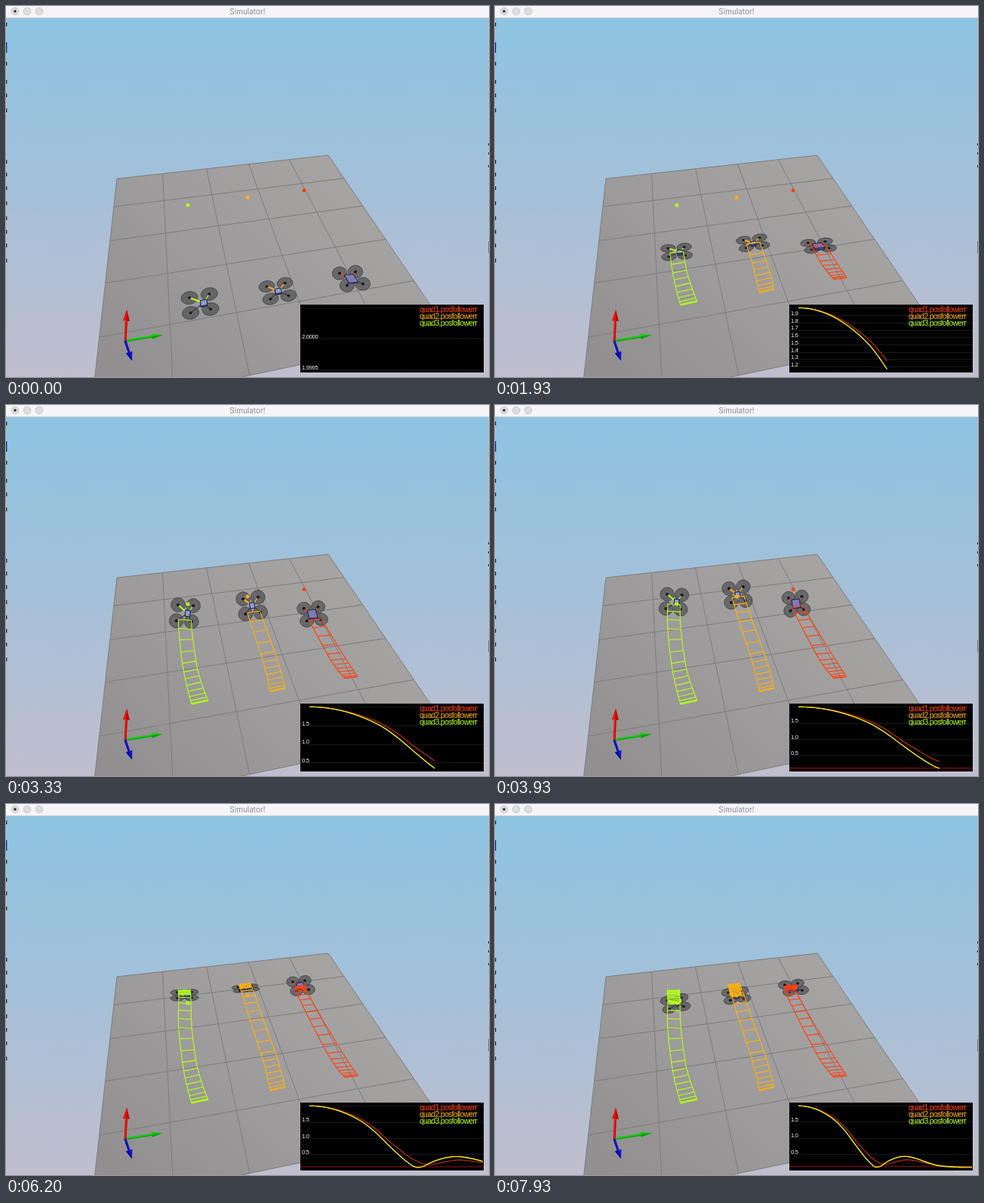
These frames come from a looping animation (640 by 492 pixels, 8 s). An HTML page with a canvas:

```html
<!DOCTYPE html>
<html lang="en">
<head>
<meta charset="utf-8">
<title>Simulator!</title>
<style>
html, body { margin: 0; width: 100%; height: 100%; overflow: hidden; }
canvas { display: block; width: 640px; height: 492px; }
</style>
</head>
<body>
<canvas id="stage" width="640" height="492"></canvas>
<script>
const c = document.getElementById('stage').getContext('2d');
const LOOP = 8000, FPS = 15, RUNG = 13;

// Wall clock (ms) to simulation time; the simulator does not run at a steady rate.
const clock = [0, 1200, 2670, 3930, 5000, 6200, 7930];
const simAt = [0, 92, 143, 187, 224, 307, 425];

// Pose channels: centre x, y; half span across x, y; half span along x, y.
const drones = [
  { color: '#ff4010', dot: [395, 244.5], box: 0.58, shift: 0, fill: '#7f7bb4', pose: [
    [457.5, 440, 415.5, 399, 391.5, 390.5, 395.5],
    [361.5, 337, 294.5, 263.5, 248, 241, 243.5],
    [10.5, 12, 10.2, 8.8, 8.3, 8, 8.5],
    [-1, -1, -1, -1, -1, -0.8, -1],
    [5, 2.5, 2.7, 1.3, 1.8, 2.5, 3],
    [8, 2.5, 7.5, 8.5, 8.3, 6, 4.6]] },
  { color: '#ffb010', dot: [320, 254], box: 0.32, shift: 0.06, fill: '#8f9ccd', pose: [
    [360, 350, 332, 321, 316, 317.5, 319.5],
    [378, 338.5, 286, 251.5, 239, 244.5, 254],
    [12, 11, 10.3, 9.5, 9, 8.7, 9],
    [-2.2, -2, -1.2, -1.2, -1, -0.8, -1.2],
    [2.5, 2, 1.7, 1.5, 1, 1, 1.5],
    [8.3, 1.5, 9.8, 9.3, 9, 2.3, 5.2]] },
  { color: '#b4ff18', dot: [241, 264], box: 0.32, shift: 0.38, fill: '#8f9ccd', pose: [
    [257, 244.5, 237.5, 237, 236.5, 236.5, 239],
    [394.5, 351.5, 297, 261, 247.5, 253.5, 264.5],
    [13.2, 11, 10.5, 9.7, 9.5, 9.5, 9.5],
    [-2.5, -2, 0.3, 0.5, 0, -0.3, -1.7],
    [0.8, 2, -1, -0.8, 0, 0, 1.5],
    [10, 1.5, 10.7, 9.5, 9.5, 3.8, 5.7]] }
];

// Follow error of the drones over simulation time.
const errKeys = [0, 30, 60, 92, 115, 143, 158, 172, 187, 200, 212, 224, 245, 265, 290, 307, 340, 380, 425];
const errSlow = [2, 1.955, 1.82, 1.58, 1.31, 0.87, 0.66, 0.46, 0.3, 0.2, 0.17, 0.19, 0.27, 0.31, 0.27, 0.22, 0.14, 0.1, 0.08];
const errFast = [2, 1.948, 1.794, 1.515, 1.2, 0.72, 0.47, 0.26, 0.09, 0.1, 0.2, 0.29, 0.39, 0.41, 0.34, 0.26, 0.13, 0.08, 0.07];

function segment(xs, x) {
  let i = 0;
  while (i < xs.length - 2 && x > xs[i + 1]) i++;
  return i;
}

function linear(xs, ys, x) {
  const i = segment(xs, x);
  return ys[i] + (ys[i + 1] - ys[i]) * (x - xs[i]) / (xs[i + 1] - xs[i]);
}

// Cubic spline, at rest at both ends.
function spline(xs, ys, x) {
  const i = segment(xs, x), h = xs[i + 1] - xs[i], u = Math.min(1, (x - xs[i]) / h);
  const slope = k => k < 1 || k > xs.length - 2 ? 0 : (ys[k + 1] - ys[k - 1]) / (xs[k + 1] - xs[k - 1]);
  const v = 1 - u;
  return ys[i] * (1 + 2 * u) * v * v + ys[i + 1] * u * u * (3 - 2 * u)
    + h * u * v * (slope(i) * v - slope(i + 1) * u);
}

function line(points, color, width = 1) {
  c.beginPath();
  points.forEach(p => c.lineTo(p[0], p[1]));
  c.strokeStyle = color;
  c.lineWidth = width;
  c.stroke();
}

function poly(points, fill, stroke, width = 1) {
  c.beginPath();
  points.forEach(p => c.lineTo(p[0], p[1]));
  c.closePath();
  c.fillStyle = fill;
  c.fill();
  if (stroke) {
    c.strokeStyle = stroke;
    c.lineWidth = width;
    c.stroke();
  }
}

function disc(x, y, rx, ry, turn, fill, stroke) {
  c.beginPath();
  c.ellipse(x, y, rx, ry, turn, 0, Math.PI * 2);
  c.fillStyle = fill;
  c.fill();
  if (stroke) {
    c.strokeStyle = stroke;
    c.lineWidth = 0.9;
    c.stroke();
  }
}

function gradient(x0, y0, x1, y1, ...colors) {
  const g = c.createLinearGradient(x0, y0, x1, y1);
  colors.forEach((k, i) => g.addColorStop(i / (colors.length - 1), k));
  return g;
}

// Projective map from the unit square to the four floor corners.
function projector([p, q, r, s]) {
  const sum = k => p[k] - q[k] + r[k] - s[k];
  const [ax, ay, bx, by] = [q[0] - r[0], q[1] - r[1], s[0] - r[0], s[1] - r[1]];
  const det = ax * by - bx * ay;
  const g = (sum(0) * by - bx * sum(1)) / det;
  const h = (ax * sum(1) - sum(0) * ay) / det;
  return (u, v) => [0, 1].map(k =>
    ((q[k] - p[k] + g * q[k]) * u + (s[k] - p[k] + h * s[k]) * v + p[k]) / (g * u + h * v + 1));
}
const corners = [[147, 229], [427, 198], [588, 434], [113, 534]];
const floor = projector(corners);

function drawWindow() {
  c.fillStyle = gradient(0, 15, 0, 492, '#8dc4e2', '#a5c0d9', '#c1bece');
  c.fillRect(0, 0, 640, 492);

  poly(corners, gradient(420, 200, 150, 492, '#a6a4a3', '#9d9b9b', '#918f90'));
  for (let i = 0; i <= 5; i++) {
    line([floor(0, i / 5), floor(1, i / 5)], '#7d7c7d');
    line([floor(i / 5, 0), floor(i / 5, 1)], '#7d7c7d');
  }

  c.fillStyle = '#b4bec8';
  c.fillRect(0, 15, 1, 477);
  c.fillRect(639, 15, 1, 477);
  c.fillStyle = '#26262e';
  [24, 76, 100, 118, 138, 206, 223, 241, 261, 281, 299, 317, 337].forEach(y => c.fillRect(0, y - 2, 1.3, 5));
  [183, 195, 212].forEach(y => c.fillRect(639, y - 1, 1, 3));
  c.fillStyle = '#777a80';
  c.fillRect(639, 312, 1, 16);
  c.fillStyle = '#1c1c9a';
  c.fillRect(0, 48, 1.3, 14);

  c.fillStyle = '#f6f4f6';
  c.fillRect(0, 0, 640, 15);
  c.fillStyle = '#d3d3d6';
  c.fillRect(0, 15, 640, 1);
  [12, 28, 44].forEach(x => disc(x, 7, 4.8, 4.8, 0, '#dddcde', '#c3c2c4'));
  disc(12, 7, 1.8, 1.8, 0, '#333');
  c.font = '10px Inter, sans-serif';
  c.textAlign = 'center';
  c.textBaseline = 'alphabetic';
  c.fillStyle = '#8b8c9c';
  c.fillText('Simulator!', 320, 11);
}

function arrow(x, y, tipX, tipY, head, half, color, shade) {
  const len = Math.hypot(tipX - x, tipY - y);
  const dx = (tipX - x) / len, dy = (tipY - y) / len;
  const at = (along, side) => [x + dx * along - dy * side, y + dy * along + dx * side];
  const neck = len - head;
  line([[x, y], at(neck, 0)], color, 3);
  line([at(0, 1), at(neck, 1)], shade, 1);
  poly([at(neck, -half), at(len, 0), at(neck, half)], color);
  poly([at(neck, 0), at(len, 0), at(neck, half)], shade);
}

function drawAxes() {
  arrow(158, 444, 208, 436, 15, 3.5, '#10cc10', '#0a9c0a');
  arrow(158, 444, 160, 402.5, 15, 4.5, '#ee1405', '#bb0c04');
  arrow(158, 444, 167, 470.5, 12, 4.5, '#1414d0', '#0a0a98');
}

function poseAt(drone, s, tilt = s) {
  return drone.pose.map((ys, k) => spline(simAt, ys, k < 2 ? s : tilt));
}

function drawDrone(drone, s) {
  // The attitude settles sooner than the position after the start.
  const tilt = s < simAt[1] ? simAt[1] * (1 - (1 - s / simAt[1]) ** 3) : s;
  const [x, y, ax, ay, bx, by] = poseAt(drone, s, tilt);
  const span = Math.hypot(ax, ay), ratio = Math.min(1, Math.hypot(bx, by) / span);
  const at = (u, v) => [x + ax * u + bx * v, y + ay * u + by * v];
  const rx = 4 + 0.53 * span, ry = Math.max(2, rx * ratio);
  const rotors = [[-1, -1], [1, -1], [-1, 1], [1, 1]];

  rotors.forEach(([u, v]) =>
    disc(...at(u, v), rx, ry, Math.atan2(ay, ax), 'rgba(70,70,72,0.62)', '#444446'));
  rotors.forEach(([u, v], i) => {
    const hub = at(u, v);
    line([at(drone.shift, 0), hub], i < 2 ? drone.color : '#3c3c44', i === 0 ? 2 : 1.2);
    disc(...hub, 2, 1 + ratio, 0, '#17171f');
  });

  const b = drone.box, bv = b * 1.15, depth = (1 - ratio) * 5;
  const top = [[-b, -bv], [b, -bv], [b, bv], [-b, bv]].map(([u, v]) => at(u + drone.shift, v));
  poly(top.map(p => [p[0], p[1] + depth]), '#45497c', '#20203c');
  poly(top, drone.fill, '#23234a');
}

function drawTrail(drone, s) {
  const left = [], right = [];
  for (let k = 0; k <= s; k += RUNG) {
    const [x, y, ax, ay] = poseAt(drone, k);
    left.push([x - ax * 0.83, y - ay * 0.95]);
    right.push([x + ax * 0.83, y + ay * 0.95]);
  }
  if (left.length < 2) return;
  line(left, drone.color, 1.1);
  line(right, drone.color, 1.1);
  left.forEach((p, i) => line([p, right[i]], drone.color, 1.1));
}

function drawPlot(s) {
  c.save();
  c.beginPath();
  c.rect(390, 396, 243, 90);
  c.clip();
  c.fillStyle = '#000';
  c.fillRect(390, 396, 243, 90);

  let low = 1.9995;
  for (let k = 0; k <= s; k += 2) low = Math.min(low, spline(errKeys, errFast, k));
  low = Math.min(low, spline(errKeys, errFast, s));
  const high = Math.max(2, low + 0.001), range = high - low;
  const toY = v => 400.3 + (high - v) * 81.7 / range;

  const half = range / 2, power = 10 ** Math.floor(Math.log10(half) + 1e-6);
  const step = half / power > 4.99 ? 5 * power : power;
  const digits = Math.max(1, Math.ceil(-Math.log10(step) - 1e-6));
  c.font = '7.6px "Liberation Sans", Arial, sans-serif';
  c.letterSpacing = '-0.3px';
  c.textAlign = 'left';
  for (let n = Math.floor(high / step + 1e-6); n * step > low - step * 0.02; n--) {
    const y = toY(n * step);
    line([[390, Math.round(y) + 0.5], [633, Math.round(y) + 0.5]], '#191919');
    if (y < 405 || y > 484) continue;
    c.fillStyle = '#f4f4f4';
    c.fillText((n * step).toFixed(digits), 392, y - 0.2);
  }

  line([[390, toY(0.1)], [633, toY(0.1)]], '#9a1414');

  const scale = Math.min(1, 230 / Math.max(s, 1));
  const curve = (errs, color, lift) => {
    const points = [];
    for (let k = 0; k < s + 2; k += 2) {
      const now = Math.min(k, s);
      points.push([402 + now * scale, toY(spline(errKeys, errs, now) + lift * now / 100)]);
    }
    if (s > 0) line(points, color, 1.1);
  };
  curve(errSlow, '#c83010', 0);
  curve(errFast, '#f0a010', 0.004);
  curve(errFast, '#e8f226', 0);

  c.font = '10.5px "Liberation Sans", Arial, sans-serif';
  c.letterSpacing = '-0.7px';
  c.textAlign = 'right';
  drones.forEach((d, i) => {
    c.fillStyle = d.color;
    c.fillText(`quad${i + 1}.posfollowerr`, 624, 405.5 + i * 9.2);
  });
  c.restore();
}

function draw(ms) {
  const t = Math.floor((ms % LOOP) * FPS / 1000 + 0.06) * 1000 / FPS;
  const s = Math.min(425, linear(clock, simAt, t));
  drawWindow();
  drawAxes();
  drones.forEach(d => drawDrone(d, s));
  drones.forEach(d => disc(...d.dot, 2.5, 2.5, 0, d.color));
  drones.forEach(d => drawTrail(d, s));
  drawPlot(s);
}

const start = performance.now();
function tick() {
  draw(performance.now() - start);
  requestAnimationFrame(tick);
}
tick();
</script>
</body>
</html>
```
